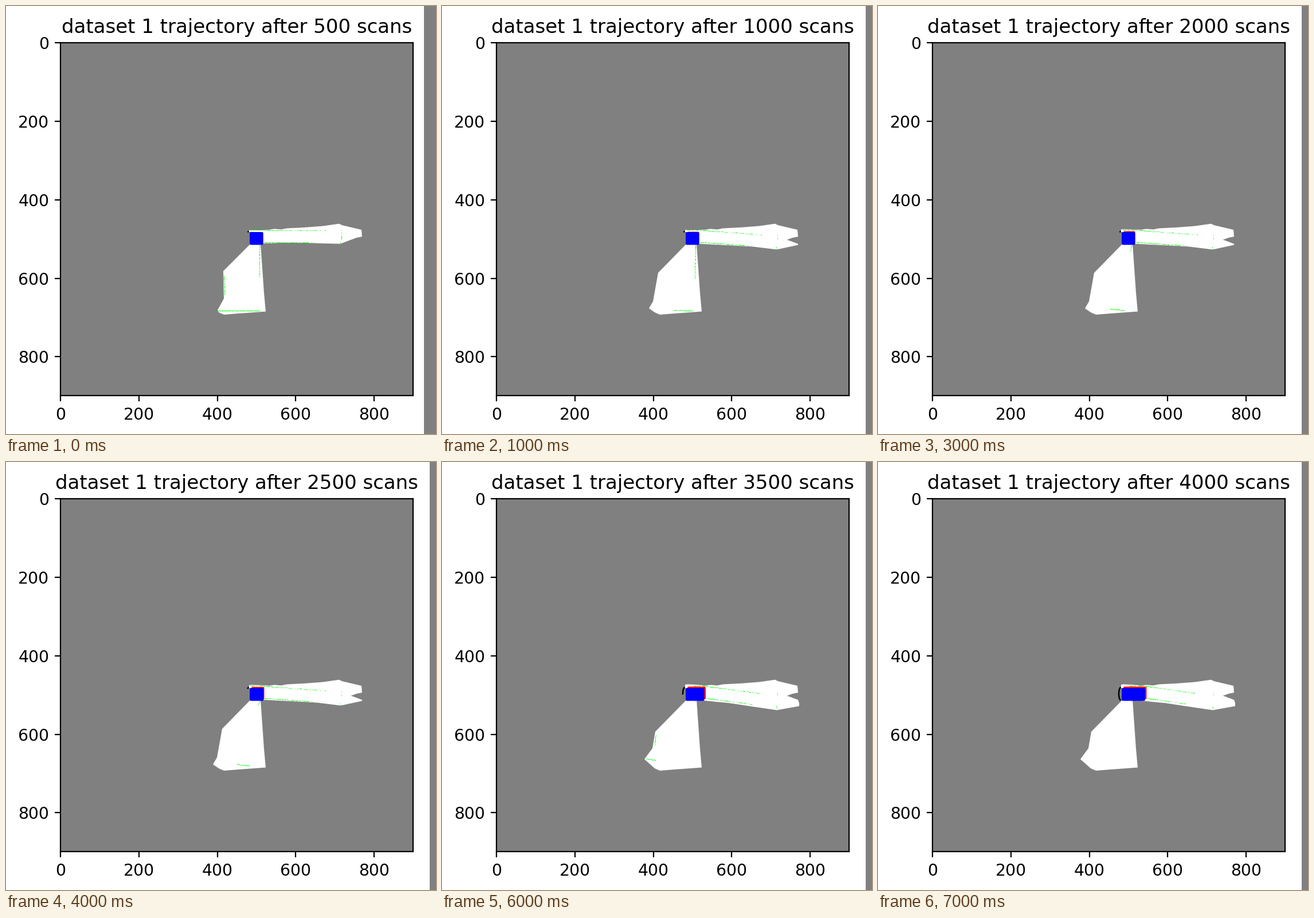
A matplotlib script that plays this animation: 750x746 px, repeating every 8 s.

```python
import numpy as np
import matplotlib.pyplot as plt
from matplotlib.animation import FuncAnimation
from matplotlib.patches import FancyBboxPatch, Polygon, Rectangle

W, H, DPI = 750, 746, 200
LEFT, TOP, SIDE = 94.8, 64, 615.4
GRAY, LIME = "#808080", "#00ff00"
STEPS, STEP_MS = 8, 1000

plt.rcParams["font.family"] = "DejaVu Sans"
plt.rcParams["font.size"] = 10.2
fig = plt.figure(figsize=(W / DPI, H / DPI), dpi=DPI, facecolor="white")

# Pixel canvas for the map, below the labelled axes
stage = fig.add_axes([0, 0, 1, 1])

ax = fig.add_axes([LEFT / W, 1 - (TOP + SIDE) / H, SIDE / W, SIDE / H])
ax.set(xlim=(-0.5, 899.5), ylim=(899.5, -0.5),
       xticks=range(0, 900, 200), yticks=range(0, 900, 200))
ax.patch.set_visible(False)
title = ax.set_title("")

# Area seen by the first scans
CORRIDOR = [(447, 392), (468, 388.5), (480, 389.5), (490, 387.5), (520, 386),
            (553, 383.5), (581, 379.5), (586, 382), (620, 390), (621, 402),
            (611, 404), (583, 414.5), (500, 412.5), (440, 414)]
ROOM = [(371, 534), (380, 538), (405, 536), (453, 532.5), (450, 500),
        (444, 414), (427, 414)]

# Left room corners: first view, wider view, widest view
FIRST = np.array([(379, 462), (380, 510), (369, 530)])
WIDE = np.array([(377, 465), (368, 515), (361, 527)])
WIDEST = np.array([(372, 470), (367, 499), (353, 518)])


def fill(points):
    stage.add_patch(Polygon(points, fc="white", lw=0))


def block(x0, y0, x1, y1, color):
    stage.add_patch(FancyBboxPatch(
        (x0, y0), x1 - x0, y1 - y0, fc=color, lw=0,
        boxstyle="round,pad=0,rounding_size=2.2"))


def gray_box(x, y, w, h):
    stage.add_patch(Rectangle((x, y), w, h, fc=GRAY, lw=0))


def echo(rng, x0, y0, x1, y1, density, fade=0):
    """Scatter single green pixels along a line, thinning towards its end."""
    n = int(max(abs(x1 - x0), abs(y1 - y0)))
    t = np.linspace(0, 1, n)
    t = t[rng.random(n) < density * (1 - fade * t)]
    stage.plot(x0 + (x1 - x0) * t, y0 + (y1 - y0) * t, ",", color=LIME)


def draw_free_space(i, turn, corners):
    fill(CORRIDOR)
    lift = min(i, 6) / 2
    fill([(424, 394), (424, 391 - lift), (428, 390.5 - lift),
          (441, 391 - lift), (462, 390), (447, 394)])
    fill([*corners, *ROOM])
    if i:
        # second prong of the corridor, drooping as the view turns
        fill([(440, 412), (602, 407.5), (621, 414.5), (621 + 2 * turn, 420),
              (621 + 2 * turn, 416.5 + 9 * turn), (584, 424.5 + 8 * turn),
              (543, 419.5 + 7 * turn), (500, 417 + 3 * turn),
              (478, 416 + 2 * turn), (440, 414)])


def draw_echoes(i, turn, corners, start):
    rng = np.random.default_rng(5)
    sag = 8 + 5 * turn if i else 0
    echo(rng, 425 + 12 * turn, 390.5, start, 391, 0.8)
    echo(rng, start, 391.5, 557, 391.5 + sag, 0.8, 0.6)
    echo(rng, start, 412.5, 540, 412.5 + 0.8 * sag, 0.8, 0.6)
    echo(rng, 585, 391 + sag, 585, 408, 0.4)
    echo(rng, 583, 413 + sag, 584, 417 + sag, 0.5)

    # right room wall gets shorter, the floor line tilts
    echo(rng, 442, 418, 442 - min(i, 2),
         np.interp(i, [1, 3, 6], [475, 428, 418]), 0.6)
    x0 = np.interp(i, [0, 1, 4, 5, 7], [370, 405, 403, 356, 354])
    x1 = np.interp(i, [0, 4, 5, 6, 7], [443, 424, 420, 372, 354])
    slope = 0.028 * i
    echo(rng, x0, 532 - slope * (440 - x0),
         x1, 532 - slope * (440 - x1), 0.95)

    # left room wall, only sometimes in range
    if i in (0, 5, 6):
        upper, lower = corners[0], corners[1]
        a, b = (upper + (lower - upper) * k for k in (0.2, 0.85))
        echo(rng, a[0] + 1 + turn, a[1], b[0] + 1 + 2 * turn, b[1], 0.75)


def draw_obstacle(bottom):
    y = np.linspace(392.5, bottom, 20)
    x = 424.5 - 4.5 * np.sqrt(1 - ((y - 404) / 12) ** 2)
    stage.plot(x, y, color="black", lw=0.9, solid_capstyle="butt")


def update(i):
    turn = np.clip((i - 4) / 1.35, 0, 1)
    drive = 17.5 * (max(i - 3, 0) / 4) ** 2.3
    corners = WIDE + (WIDEST - WIDE) * turn if i else FIRST
    blue_end = 448.5 + drive

    stage.clear()
    stage.set(xlim=(0, W), ylim=(H, 0))
    stage.axis("off")
    gray_box(LEFT, TOP, SIDE, SIDE)
    edge = 739 if i else 729
    gray_box(edge, 0, W - edge, H)

    draw_free_space(i, turn, corners)
    draw_echoes(i, turn, corners, blue_end + 2)
    gray_box(421, 393.5, 6, 21.5)
    draw_obstacle(394.5 + 1.2 * drive)

    # estimate in red slips out behind the driven area in blue
    red_top = 394 - 0.5 * min(i, 5)
    block(428, red_top, blue_end + 1.2 * np.clip(i - 3, 0, 2),
          red_top + 22, "red")
    block(425, 394, blue_end, 416.3, "blue")
    title.set_text(f"dataset 1 trajectory after {500 * (i + 1)} scans")


anim = FuncAnimation(fig, update, frames=STEPS, interval=STEP_MS, repeat=True)
plt.show()
```
